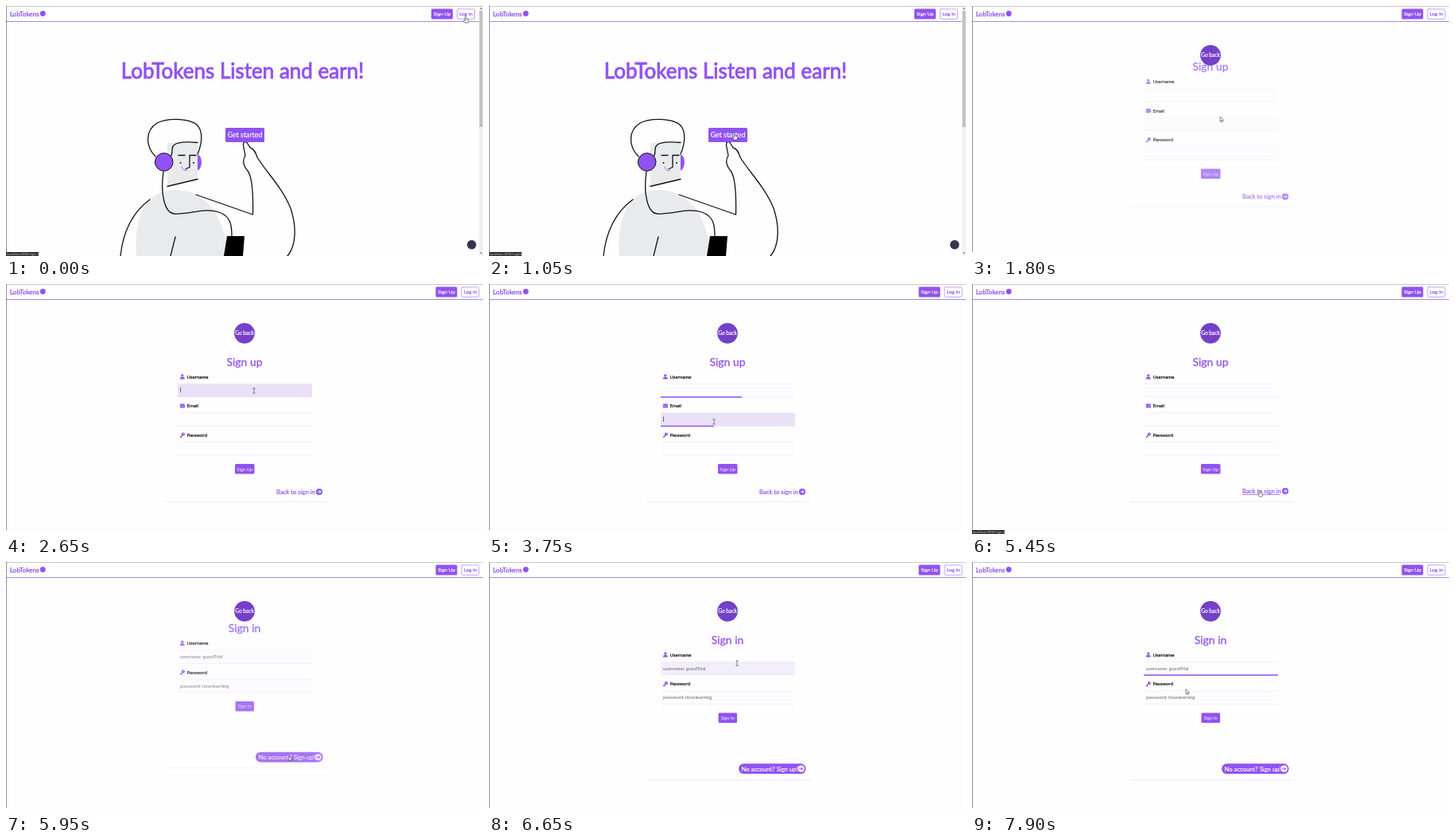
Animation, 600 px wide and 314 px high, one loop 8000 ms. Source, as an HTML page with a canvas:

```html
<!DOCTYPE html>
<html lang="en">
<head>
<meta charset="utf-8">
<title>LobTokens</title>
<style>
html, body { margin: 0; width: 100%; height: 100%; overflow: hidden; background: #fefdff; }
canvas { display: block; width: 600px; height: 314px; }
</style>
</head>
<body>
<canvas id="stage" width="600" height="314"></canvas>
<script>
const ctx = document.getElementById('stage').getContext('2d');
const LOOP = 8000, SIGN_UP = 1500, SIGN_IN = 5650;
const PURPLE = '#9152f2', DEEP = '#7440c8', INK = '#111';
const BRAND = 'LobTokens';

// Pointer stops: time, x, y
const STOPS = [
  [0, 578, 14], [150, 578, 14], [800, 309, 161], [1550, 309, 161], [1800, 312, 139.5],
  [2450, 312, 134], [2750, 312, 134], [3450, 283, 173], [3750, 283, 173],
  [3900, 300, 204], [4000, 302, 205], [4300, 428, 194], [4600, 428, 194], [5250, 362, 260],
  [5800, 362, 260], [6500, 312, 127], [7550, 312, 127], [7850, 269, 160], [8000, 269, 160]
];
const ROWS = [133.5, 170, 206.5];

const clamp = v => Math.max(0, Math.min(1, v));
const smooth = v => v * v * (3 - 2 * v);
const easeOut = v => Math.sin(clamp(v) * Math.PI / 2);
const ramp = (t, start, length = 500) => 1 - Math.pow(1 - smooth(clamp((t - start) / length)), 1.8);

function pointer(t) {
  const i = Math.max(1, STOPS.findIndex(s => s[0] > t));
  const [t0, x0, y0] = STOPS[i - 1], [t1, x1, y1] = STOPS[i];
  const k = smooth((t - t0) / (t1 - t0));
  return { x: x0 + (x1 - x0) * k, y: y0 + (y1 - y0) * k };
}

function text(str, x, y, size, color, align = 'left', weight = 400, thick = 0.2) {
  ctx.font = `${weight} ${size}px Lato, "Open Sans", sans-serif`;
  ctx.textAlign = align;
  ctx.textBaseline = 'alphabetic';
  ctx.fillStyle = ctx.strokeStyle = color;
  ctx.fillText(str, x, y);
  if (thick) {
    ctx.lineWidth = thick;
    ctx.strokeText(str, x, y);
  }
}

function rect(x, y, w, h, color) {
  ctx.fillStyle = color;
  ctx.fillRect(x, y, w, h);
}

function round(x, y, w, h, r, fill, stroke) {
  ctx.beginPath();
  ctx.roundRect(x, y, w, h, r);
  if (fill) { ctx.fillStyle = fill; ctx.fill(); }
  if (stroke) { ctx.strokeStyle = stroke; ctx.lineWidth = 0.8; ctx.stroke(); }
}

function disc(x, y, r, color) {
  ctx.beginPath();
  ctx.arc(x, y, r, 0, 7);
  ctx.fillStyle = color;
  ctx.fill();
}

function shape(d, fill, stroke, width = 1.3) {
  const p = new Path2D(d);
  if (fill) { ctx.fillStyle = fill; ctx.fill(p); }
  if (stroke) {
    ctx.strokeStyle = stroke;
    ctx.lineWidth = width;
    ctx.lineCap = ctx.lineJoin = 'round';
    ctx.stroke(p);
  }
}

function header(dx) {
  rect(0, 0, 600, 19, '#fff');
  rect(0, 19, 600, 1, '#a48be0');
  text(BRAND, 5, 12.5, 8.1, PURPLE, 'left', 400, 0.3);
  disc(46.3, 9.5, 3.4, PURPLE);
  round(535 + dx, 3.5, 27, 13, 1.5, PURPLE);
  text('Sign Up', 548.5 + dx, 12.4, 6.4, '#fff', 'center');
  round(567.5 + dx, 3.9, 22, 12.4, 1.5, '#fff', '#b48bf6');
  text('Log in', 578.5 + dx, 12.4, 6.3, PURPLE, 'center');
}

function statusBar(label) {
  rect(0, 309, 41, 5, '#303033');
  text(label, 1, 313, 4.2, '#c8c8cc', 'left', 400, 0);
}

function listener() {
  shape('M164 314C160 262 178 231 212 231C249 231 274 258 279 314Z', '#e9eaec');
  shape('M203 172H241V217L203 226Z', '#e9eaec');
  shape('M241 186.5C247.5 188 247.5 204 241 206.5Z', PURPLE);
  shape('M188 189C176 177 174 157 190 147C203 140 230 141 240 149C249 158 246 174 241 186M241 171.5C221 170 209 171 209 180C209 187 208 189 205 190', null, INK);
  disc(198.7, 196, 11.3, PURPLE);
  shape('M187.4 196A11.3 11.3 0 1 0 210 196A11.3 11.3 0 1 0 187.4 196', null, INK, 1);
  shape('M217 187.5H225M231 187.5H239M231 187.5V202.5L226 204.5M203 226.5L241 217.5', null, INK);
  disc(219.5, 197, 1, INK);
  disc(236, 197, 1, INK);
  shape('M221 202C222 206 225 207.5 228 206', null, PURPLE, 0.9);
  shape('M198 208C194 235 199 260 212 261C232 262 249 253 268 259C282 264 284 274 284 289', null, INK);
  shape('M181 243C158 260 147 285 144 314M213 290L207 314', null, INK);
  shape('M239 237L310.5 262C311 240 310 215 304 207C298 200 297 194 301 188L298.5 175C298 170 302 169 304 173L307 178C312 179 314 184 316 190C326 207 347 227 358 254C365 275 366 300 354 314', null, INK);
  shape('M278 289H300L298 314H274Z', '#000');
}

function landing(t) {
  text(BRAND + ' Listen and earn!', 297.5, 90.5, 26, PURPLE, 'center', 400, 0.9);
  listener();
  round(276, 153, 49, 18, 1.5, PURPLE);
  text('Get started', 300.5, 165, 8.8, '#fff', 'center');
  header(0);
  rect(595, 0, 5, 314, '#f1f1f1');
  rect(595.5, 6, 4, 146, '#c1c1c1');
  shape('M596 4L597.5 2L599 4Z', '#777');
  shape('M596 309.5L597.5 311.5L599 309.5Z', '#777');
  disc(585.7, 299.8, 5.8, '#39344c');
  if (t < 250) statusBar('localhost:3000/sign_in');
  else if (t > 700) statusBar('localhost:3000/register');
}

function icon(kind, x, y) {
  if (kind === 'user') {
    disc(x, y - 1.6, 1.6, PURPLE);
    shape(`M${x - 2.8} ${y + 3}V${y + 2}Q${x - 2.8} ${y + .3} ${x - 1} ${y + .3}H${x + 1}Q${x + 2.8} ${y + .3} ${x + 2.8} ${y + 2}V${y + 3}Z`, PURPLE);
  } else if (kind === 'mail') {
    round(x - 3, y - 2.4, 6.2, 5, 0.8, PURPLE);
    shape(`M${x - 3} ${y - 1}L${x} ${y + 1}L${x + 3} ${y - 1}`, null, '#fff', 0.5);
  } else {
    disc(x + 1.2, y - 1, 2.1, PURPLE);
    shape(`M${x + .5} ${y}L${x - 2.3} ${y + 2.6}H${x - 1}`, null, PURPLE, 1.3);
    disc(x + 1.8, y - 1.6, 0.6, '#fff');
  }
}

function arrowDisc(x, y, fill, line) {
  disc(x, y, 4.1, fill);
  shape(`M${x - 2} ${y}H${x + 2}M${x + .2} ${y - 1.9}L${x + 2.1} ${y}L${x + .2} ${y + 1.9}`, null, line, 1);
}

// One labelled input; line is how far the underline has grown.
function field(row, label, kind, hint, hover, line, caret) {
  const y = ROWS[row];
  icon(kind, 221.8, y - 17);
  text(label, 227.5, y - 14.6, 6.1, INK);
  rect(216, y - 8.5, 169, 17, '#fdfcff');
  rect(216, y - 8.5, 169, 0.7, '#f0eef4');
  rect(216, y + 8, 169, 0.7, '#ebe9ef');
  if (hover) rect(216, y - 8, 169, 16.5, `rgba(228,217,246,${0.75 * hover})`);
  if (hint) text(hint, 219, y + 2.2, 6, '#666', 'left', 400, 0);
  if (line > 0) rect(216, y + 7.8, 169 * line, 1.5, PURPLE);
  if (caret) rect(219, y - 3.5, 0.7, 6.5, '#333');
}

function form(t, p) {
  const login = t >= SIGN_IN;
  const k = easeOut((t - (login ? SIGN_IN : SIGN_UP + 70)) / 600);
  const dy = -50 * (1 - k);
  const over = row => Math.abs(p.y - dy - ROWS[row]) < 8.5 && p.x > 216 && p.x < 385;
  const hover = row => over(row) ? (login ? 0.55 : 1) : 0;
  const blink = start => t > start && (t - start) % 1000 < 500;
  ctx.save();
  ctx.globalAlpha = 0.3 + 0.7 * k;
  ctx.translate(0, dy);
  rect(199, 273, 206, 0.7, '#e8e6ec');
  text(login ? 'Sign in' : 'Sign up', 300, 102.5, 13.9, PURPLE, 'center', 400, 0.3);
  if (login) {
    field(0, 'Username', 'user', 'username: guestTrial', hover(0), ramp(t, 6850), false);
    field(1, 'Password', 'key', 'password: ilovelearning', hover(1), 0, false);
    round(288.5, 189.5, 23.5, 12.5, 1.5, PURPLE);
    text('Sign In', 300.2, 198, 5.8, '#fff', 'center', 400, 0);
    round(314, 253.3, 84.5, 12.7, 6.3, PURPLE);
    text('No account? Sign up!', 317.5, 262.5, 7.7, '#fff');
    arrowDisc(392.6, 259.7, '#fff', PURPLE);
  } else {
    const first = ramp(t, 2650) - ramp(t, 3590);
    const second = ramp(t, 3590) - ramp(t, 3850);
    const third = ramp(t, 3850) - ramp(t, 4600);
    field(0, 'Username', 'user', '', hover(0), first, t < 3590 && blink(2650));
    field(1, 'Email', 'mail', '', hover(1), second, t < 3850 && blink(3590));
    field(2, 'Password', 'key', '', hover(2), third, t < 4600 && blink(3850));
    round(288, 226, 24.5, 12.5, 1.5, PURPLE);
    text('Sign Up', 300.2, 234.5, 5.8, '#fff', 'center', 400, 0);
    const onLink = t > 5100;
    const lift = onLink ? 1 : 0;
    text('Back to sign in', 340, 264 - lift, 7.7, PURPLE);
    if (onLink) rect(340, 264.2, 47, 0.7, PURPLE);
    arrowDisc(394, 261 - lift, PURPLE, '#fff');
  }
  ctx.restore();
  disc(300, 61.8, 12.9, DEEP);
  text('Go back', 300, 64.2, 6.6, '#fff', 'center');
  header(5.5);
  if (t > 5100 && t < 5800) statusBar('localhost:3000/sign_in');
  return over(0) || over(1) || (!login && over(2));
}

function cursor(p, kind) {
  ctx.save();
  ctx.translate(p.x, p.y);
  if (kind === 'beam') {
    shape('M-1.2 -3H1.2M0 -3V3M-1.2 3H1.2', null, '#555', 0.7);
  } else if (kind === 'hand') {
    shape('M-.8 0Q0 -1 .8 0V2.2L3.4 3Q4 3.2 3.8 4.2L3 7H-.8L-2.6 4.4Q-2.6 3.2 -.8 4.2Z', '#fff', '#333', 0.6);
  } else {
    shape('M0 0V5.6L1.3 4.5L2.3 6.5L3.2 6L2.3 4.1H4Z', '#fff', '#333', 0.6);
  }
  ctx.restore();
}

function draw(t) {
  const p = pointer(t);
  let kind = 'arrow';
  rect(0, 0, 600, 314, '#fefdff');
  if (t < SIGN_UP) {
    landing(t);
    if (t < 250 || t > 700) kind = 'hand';
  } else if (form(t, p)) {
    kind = 'beam';
  } else if (t > 5100 && t < 5900) {
    kind = 'hand';
  }
  rect(0, 0, 600, 0.6, '#a5a3aa');
  rect(0, 0, 0.8, 309, '#77757c');
  cursor(p, kind);
}

function frame(now) {
  draw(now % LOOP);
  requestAnimationFrame(frame);
}
requestAnimationFrame(frame);
</script>
</body>
</html>
```
